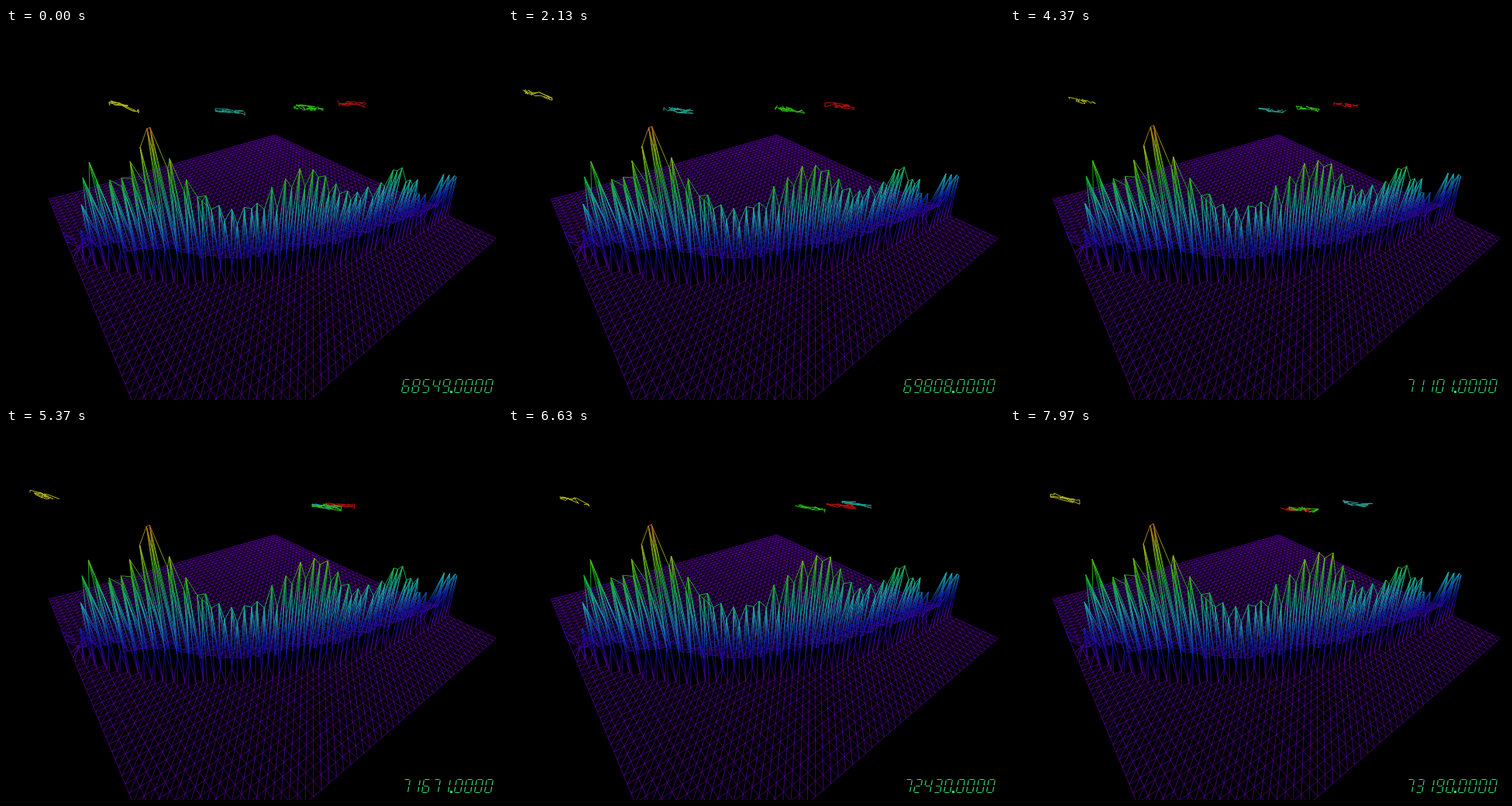
Write an HTML page with a canvas that moves like this. It is 640x480 px and loops after 8000 ms.

```html
<!DOCTYPE html>
<html lang="en">
<head>
<meta charset="utf-8">
<title>Wireframe landscape</title>
<style>
  html, body { margin: 0; width: 100%; height: 100%; overflow: hidden; background: #000; }
  canvas { display: block; }
</style>
</head>
<body>
<canvas id="stage" width="640" height="480"></canvas>
<script>
const ctx = document.getElementById('stage').getContext('2d');
const LOOP = 8000;
const lerp = (a, b, p) => a + (b - a) * p;
const bell = (x, centre, width) => Math.exp(-(((x - centre) / width) ** 2));
const rand = (a, b = 0) => {
  const s = Math.sin(a * 127.1 + b * 311.7 + 17) * 43758.5453;
  return s - Math.floor(s);
};

// Camera: 60 degree field of view, 35 degrees down, one unit above the floor.
const FOCAL = 415.7, COS = 0.8192, SIN = 0.5736;
const HALF = 0.845, CENTRE_Z = 1.396, YAW_COS = 0.803, YAW_SIN = 0.596;
const CELLS = 50;

function project(i, j, h) {
  const a = HALF * (2 * i / CELLS - 1), b = HALF * (2 * j / CELLS - 1);
  const x = a * YAW_COS + b * YAW_SIN;
  const z = CENTRE_Z + a * YAW_SIN - b * YAW_COS;
  const drop = 1 - h;
  const depth = z * COS + drop * SIN;
  return [320 + FOCAL * x / depth, 240 + FOCAL * (drop * COS - z * SIN) / depth];
}

// Floor distance seen at screen row y, and the curve along which the ridge stands.
const reach = y => (FOCAL * COS + (240 - y) * SIN) / (FOCAL * SIN - (240 - y) * COS);
const ridgeFoot = x => 325 - 0.00095 * (x - 270) ** 2;

// Ridge profile along the screen: centre, width, gain.
const HILLS = [
  [92, 24, -0.3], [148, 22, 0.15], [218, 40, 0.28], [217, 5, 0.11],
  [372, 42, 0.17], [478, 15, 0.09], [524, 9, -0.16], [565, 22, -0.08]
];
const profile = x => HILLS.reduce((sum, [c, w, gain]) => sum + gain * bell(x, c, w), 0.32);

function makeNode(i, j) {
  const [x, y] = project(i, j, 0);
  const rows = (reach(y) - reach(ridgeFoot(x))) * CELLS / (2 * HALF);
  const onRidge = rows >= 0.5 && rows < 1.95;
  const node = { i, j, onRidge, base: 0, growth: 0 };
  if (onRidge) {
    const tall = (i + j) % 2 ? 1 - 0.04 * rand(i, j) : 0.72 + 0.2 * rand(i, j);
    node.base = Math.max(0, profile(x)) * tall;
    node.growth = (0.012 + 0.08 * bell(x, 398, 28)) * tall;
  } else if (rows > 0) {
    node.base = 0.2 * Math.max(0, profile(x)) * Math.exp(-rows / 5) * (0.8 + 0.5 * rand(j, i));
  }
  return node;
}

const nodes = [];
for (let i = 0; i <= CELLS; i++) {
  nodes.push([]);
  for (let j = 0; j <= CELLS; j++) nodes[i].push(makeNode(i, j));
}
const still = [], moving = [];
for (const node of nodes.flat()) {
  for (const [di, dj] of [[1, 0], [0, 1], [1, -1]]) {
    const other = nodes[node.i + di]?.[node.j + dj];
    if (other) (node.onRidge || other.onRidge ? moving : still).push([node, other]);
  }
}

function heightColour(h) {
  const hue = 275 * (1 - Math.min(1, h / 0.72) ** 1.1);
  const lift = Math.min(1, h / 0.25);
  return `hsl(${hue}, ${lerp(100, 78, lift)}%, ${lerp(28, 39, lift)}%)`;
}

function drawEdge(g, [from, to], progress) {
  const h0 = from.base + from.growth * progress, h1 = to.base + to.growth * progress;
  const [x0, y0] = project(from.i, from.j, h0);
  const [x1, y1] = project(to.i, to.j, h1);
  let paint = heightColour((h0 + h1) / 2);
  if (Math.abs(h1 - h0) > 0.04) {
    paint = g.createLinearGradient(x0, y0, x1, y1);
    for (let s = 0; s <= 5; s++) paint.addColorStop(s / 5, heightColour(lerp(h0, h1, s / 5)));
  }
  g.strokeStyle = paint;
  g.beginPath();
  g.moveTo(x0, y0);
  g.lineTo(x1, y1);
  g.stroke();
}

const floor = document.createElement('canvas');
floor.width = 640;
floor.height = 480;
const floorCtx = floor.getContext('2d');
floorCtx.lineWidth = 0.8;
still.forEach(edge => drawEdge(floorCtx, edge, 0));

const KEY_TIMES = [0, 1170, 2130, 3370, 5370, 6630, 7970];
const STEPS = [68549, 69241, 69808, 70530, 71671, 72430, 73190];
const WALKERS = [
  { colour: '#24998c', tilt: 0.1, x: [289, 268, 220, 264, 414, 450, 449] },
  { colour: '#b01410', tilt: 0.07, x: [446, 437, 428, 446, 431, 430, 369] },
  { colour: '#2cc010', tilt: 0.13, x: [390, 361, 364, 345, 414, 390, 379] },
  { colour: '#b4b818', tilt: 0.27, x: [152, 72, 38, 133, 50, 86, 71] }
];
const ATOMS = 22;

function atom(seed, j) {
  const along = j / (ATOMS - 1) * 2 - 1 + (rand(seed, j) - 0.5) * 1.4;
  return [Math.max(-1, Math.min(1, along)), (rand(j, seed) - 0.5) * 7];
}

function drawWalker({ colour, tilt, x }, id, k, p) {
  const bump = Math.sin(Math.PI * p);
  const cx = lerp(x[k], x[k + 1], p) + 6 * bump * Math.sin(p * 19 + id * 2);
  const cy = 107.5 - 0.00036 * (cx - 285) ** 2;
  const half = 19 + 4 * bump * Math.sin(p * 31 + id);
  const seed = id * 40 + k * 7;
  ctx.strokeStyle = colour;
  ctx.lineWidth = 1;
  ctx.beginPath();
  for (let j = 0; j < ATOMS; j++) {
    const [u0, v0] = atom(seed, j), [u1, v1] = atom(seed + 7, j);
    const u = lerp(u0, u1, p) * half;
    ctx.lineTo(cx + u, cy + u * tilt + lerp(v0, v1, p));
  }
  ctx.stroke();
}

// Seven-segment strokes on an 8 by 17 cell.
const SEGMENTS = {
  a: [1, 0, 7, 0], b: [8, 1, 8, 7.5], c: [8, 9.5, 8, 16], d: [1, 17, 7, 17],
  e: [0, 9.5, 0, 16], f: [0, 1, 0, 7.5], g: [1, 8.5, 7, 8.5]
};
const DIGITS = ['abcdef', 'bc', 'abged', 'abgcd', 'fgbc', 'afgcd', 'afgedc', 'abc', 'abcdefg', 'abcfgd'];

function drawCounter(value) {
  ctx.strokeStyle = ctx.fillStyle = '#34dc70';
  ctx.lineWidth = 1.2;
  [...value + '0000'].forEach((digit, place) => {
    const x = 513.5 + 13 * place + (place > 4 ? 3 : 0);
    ctx.save();
    ctx.transform(1, 0, -0.18, 1, x, 453.5);
    ctx.beginPath();
    for (const name of DIGITS[digit]) {
      const [x0, y0, x1, y1] = SEGMENTS[name];
      ctx.moveTo(x0, y0);
      ctx.lineTo(x1, y1);
    }
    ctx.stroke();
    ctx.restore();
  });
  ctx.fillRect(573, 468, 3, 3);
}

function draw(now) {
  // Thirty pictures a second, each starting on a multiple of 10 ms.
  const t = Math.round(Math.floor((now % LOOP + 4) * 0.03) / 0.3) * 10 % LOOP;
  let k = 0;
  while (k < KEY_TIMES.length - 2 && t >= KEY_TIMES[k + 1]) k++;
  const p = (t - KEY_TIMES[k]) / (KEY_TIMES[k + 1] - KEY_TIMES[k]);

  ctx.fillStyle = '#000';
  ctx.fillRect(0, 0, 640, 480);
  ctx.drawImage(floor, 0, 0);
  ctx.lineWidth = 0.9;
  moving.forEach(edge => drawEdge(ctx, edge, t / LOOP));
  WALKERS.forEach((walker, id) => drawWalker(walker, id, k, p));
  drawCounter(Math.round(lerp(STEPS[k], STEPS[k + 1], p)));
  requestAnimationFrame(draw);
}
requestAnimationFrame(draw);
</script>
</body>
</html>
```
